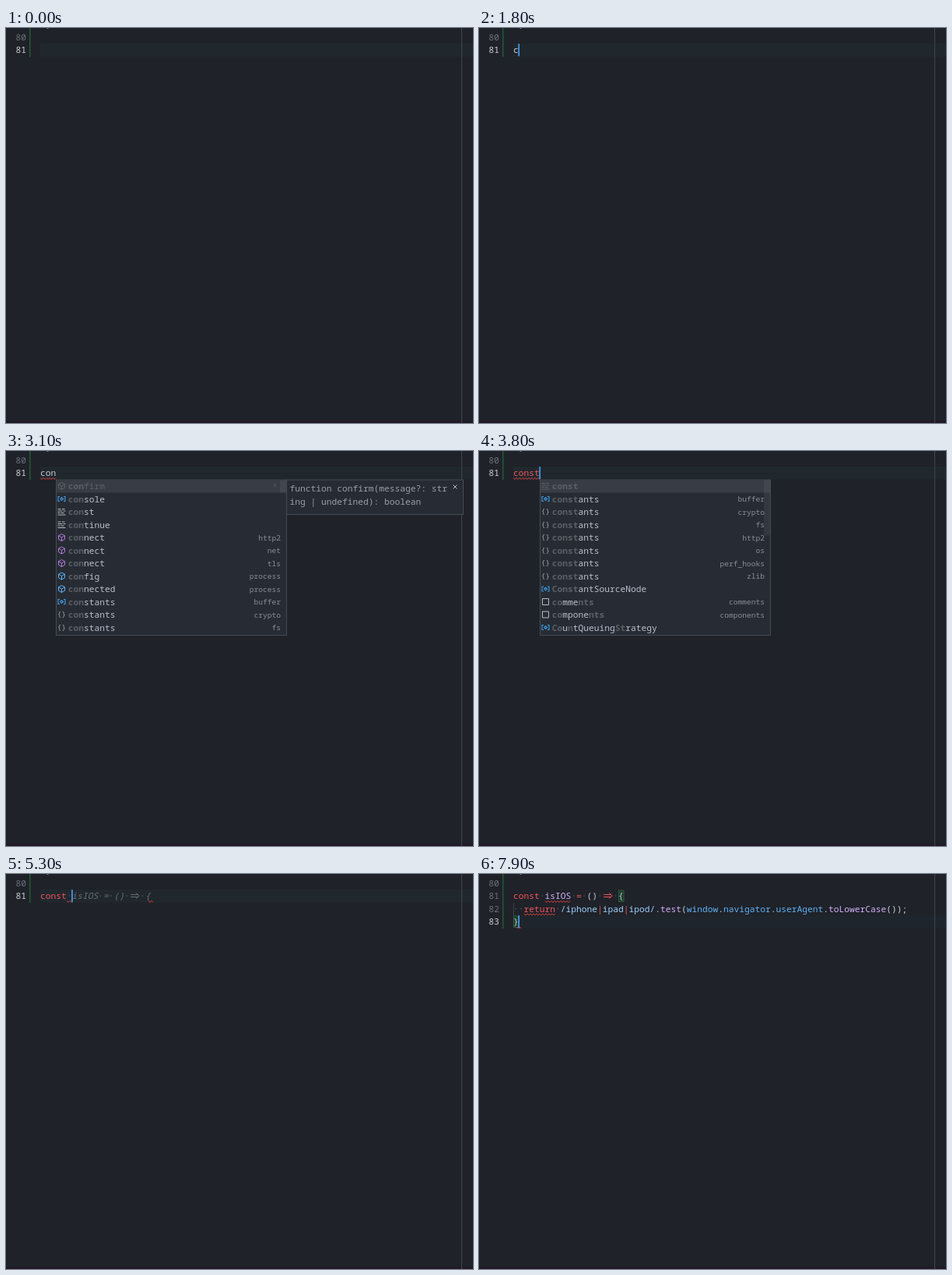
Recreate the animation shown at these times as an HTML page with a canvas. Size 600 px wide and 507 px high, loop 8 s.

```html
<!DOCTYPE html>
<html lang="en">
<head>
<meta charset="utf-8">
<title>Code editor completion</title>
<style>
html, body { margin: 0; width: 100%; height: 100%; overflow: hidden; background: #1f2229; }
canvas { display: block; width: 600px; height: 507px; }
</style>
</head>
<body>
<canvas id="stage" width="600" height="507"></canvas>
<script>
const ctx = document.getElementById('stage').getContext('2d');
const LOOP = 8000, CH = 6.75, LEFT = 44, ROW = 16.5;
const FACE = '"Noto Sans Mono", "DejaVu Sans Mono", monospace';
const RED = '#f2545b', LILAC = '#d2b0fa', SKY = '#9bd0ff', BLUE = '#5fb2f5',
      LIGHT = '#c6cdd6', GHOST = '#686c73', DIM = '#5c5f66', PURPLE = '#b07bd8';

// Rows: icon, label with matched parts between stars, origin
const conRows = ['m *con*firm', 'v *con*sole', 'k *con*st', 'k *con*tinue', 'm *con*nect http2',
  'm *con*nect net', 'm *con*nect tls', 'f *con*fig process', 'f *con*nected process',
  'v *con*stants buffer', 'n *con*stants crypto', 'n *con*stants fs'];
const constRows = ['k *const*', 'v *const*ants buffer', 'n *const*ants crypto', 'n *const*ants fs',
  'n *const*ants http2', 'n *const*ants os', 'n *const*ants perf_hooks', 'n *const*ants zlib',
  'v *Const*antSourceNode', 's *co*mme*nts* comments', 's *co*mpone*nts* components',
  'v *Co*u*n*tQueuing*St*rategy'];

const declared = [['const', RED], [' '], ['isIOS', LILAC], [' '], ['=', RED], [' '], ['()', LIGHT],
  [' '], ['=>', RED], [' '], ['{', LIGHT]];
const body = [['  '], ['return', RED], [' '], ['/iphone', SKY], ['|', RED], ['ipad', SKY], ['|', RED],
  ['ipod/', SKY], ['.', LIGHT], ['test', LILAC], ['(', LIGHT], ['window', BLUE], ['.', LIGHT],
  ['navigator', BLUE], ['.', LIGHT], ['userAgent', BLUE], ['.', LIGHT], ['toLowerCase', LILAC],
  ['());', LIGHT]];
const hint = declared.slice(2).map(([s]) => [s, GHOST]);
const bodyHint = body.map(([s]) => [s.replace(/ /g, '\u00a0'), GHOST]);
const typed = s => [[s, LIGHT]];
const keyword = declared.slice(0, 1);

// Each state holds from time t; blink is when the caret starts to pulse
const states = [
  { t: 0, text: [], col: 0, hidden: true },
  { t: 400, text: [], col: 0, blink: -200 },
  { t: 1700, text: typed('c'), col: 1, blink: 2200 },
  { t: 2000, text: typed('co'), col: 2, blink: 2500 },
  { t: 2100, text: typed('co'), col: 2, blink: 2600, rows: conRows, doc: true, wavy: [[44, 57.5]] },
  { t: 2200, text: typed('con'), col: 3, blink: 2600, rows: conRows, doc: true, wavy: [[44, 64]] },
  { t: 3700, text: typed('cons'), col: 4, blink: 4200, rows: constRows, wavy: [[44, 71]] },
  { t: 3800, text: keyword, col: 5, blink: 4300, rows: constRows, wavy: [[44, 78]] },
  { t: 5000, text: declared.slice(0, 2), col: 6, blink: 5500, wavy: [[44, 78]] },
  { t: 5200, text: declared.slice(0, 2), col: 6, blink: 5700, hint, wavy: [[78, 84], [183, 190]] },
  { t: 5600, text: declared, col: 21, blink: 6000 },
  { t: 6200, text: declared, col: 21, blink: 6000, block: true, wavy: [[44, 78], [176, 189]] },
  { t: 7200, text: declared, col: 1, blink: 7800, done: true },
  { t: 7500, text: declared, col: 1, blink: 7800, done: true,
    wavy: [[85, 118], [58, 98, 1]], checked: true }
];

function box(x, y, w, h, color) {
  ctx.fillStyle = color;
  ctx.fillRect(x, y, w, h);
}

function path(color, width, ...lines) {
  ctx.strokeStyle = color;
  ctx.lineWidth = width;
  ctx.beginPath();
  for (const pts of lines)
    for (let i = 0; i < pts.length; i += 2) ctx[i ? 'lineTo' : 'moveTo'](pts[i], pts[i + 1]);
  ctx.stroke();
}

function frame(x, y, w, h, fill, line) {
  box(x, y, w, h, line);
  box(x + 1, y + 1, w - 2, h - 2, fill);
}

function write(s, x, y, color, { style = '', size = 11.25, align = 'left' } = {}) {
  ctx.font = `${style} ${size}px ${FACE}`;
  ctx.textAlign = align;
  ctx.fillStyle = color;
  ctx.fillText(s, x, y);
}

function arrow(x, y, color) {
  path(color, 1, [x + 1.5, y - 5.5, x + 10.5, y - 5.5], [x + 1.5, y - 2.5, x + 10.5, y - 2.5],
    [x + 8.5, y - 7.5, x + 12.5, y - 4, x + 8.5, y - 0.5]);
}

function code(line, tokens, col = 0, style = '') {
  const y = 32 + line * ROW;
  for (const [s, color] of tokens) {
    const x = LEFT + col * CH;
    if (s[0] === ' ')
      for (let i = 0; i < s.length; i++) box(x + i * CH + 2.7, y - 4.6, 1.3, 1.3, '#555a63');
    else if (s === '=>') arrow(x, y, color);
    else write(s, x, y, color, { style });
    col += s.length;
  }
}

function squiggle([from, to, line = 0]) {
  const pts = [];
  for (let x = from, i = 0; x <= to; x += 2, i++) pts.push(x, 34.4 + line * ROW + (i % 2) * 2);
  path('#e5403f', 1, pts);
}

function icon(kind, x, y, dim) {
  const color = dim ? DIM : { m: PURPLE, f: BLUE, v: '#3f9be6', k: '#b4bac3', n: '#a4aab3', s: '#b4bac3' }[kind];
  if (kind === 'm' || kind === 'f')
    path(color, 1, [x + 5, y - 4.5, x + 9, y - 2.3, x + 9, y + 2.2, x + 5, y + 4.5, x + 1, y + 2.2,
      x + 1, y - 2.3, x + 5, y - 4.5], [x + 1, y - 2.3, x + 5, y, x + 9, y - 2.3], [x + 5, y, x + 5, y + 4.5]);
  else if (kind === 'v') {
    path(color, 1.1, [x + 2.5, y - 3, x + .5, y - 3, x + .5, y + 3, x + 2.5, y + 3],
      [x + 7.5, y - 3, x + 9.5, y - 3, x + 9.5, y + 3, x + 7.5, y + 3]);
    path(color, 1.3, [x + 3, y, x + 5, y - 1.7, x + 7, y, x + 5, y + 1.7, x + 3, y]);
  } else if (kind === 'k')
    path(color, 1, [x, y - 3.5, x + 4, y - 3.5], [x + 5.5, y - 3.5, x + 9, y - 3.5], [x, y - 1, x + 6, y - 1],
      [x + 7, y - 1, x + 10, y - 1], [x, y + 1.5, x + 3, y + 1.5], [x + 4, y + 1.5, x + 8, y + 1.5],
      [x, y + 4, x + 10, y + 4]);
  else if (kind === 'n') write('{}', x + 5, y + 3.3, color, { size: 9, align: 'center' });
  else path(color, 1, [x + 1, y - 4, x + 9, y - 4, x + 9, y + 4, x + 1, y + 4, x + 1, y - 4.5]);
}

function popup(x, rows, doc, prefix) {
  frame(x, 36.5, 297, 200.5, '#272c34', '#464b53');
  box(x + 1, 37.5, 295, 16, '#383d45');
  box(x + 288, 37.5, 8, doc ? 16 : 71, 'rgba(130,138,150,.13)');
  rows.forEach((row, i) => {
    const [kind, label, origin] = row.split(' ');
    const y = 45 + i * ROW;
    let tx = x + 15.7;
    icon(kind, x + 2.5, y, !i);
    label.split('*').forEach((part, j) => {
      const cut = doc && j === 1 ? prefix : part.length;
      const matched = part.slice(0, cut), rest = part.slice(cut);
      write(matched, tx, y + 4, j % 2 || !i ? DIM : '#b9c0cb', { style: j % 2 ? 'bold' : '' });
      if (rest) write(rest, tx + cut * CH, y + 4, i ? '#b9c0cb' : DIM);
      tx += part.length * CH;
    });
    if (origin) write(origin, x + 289, y + 3.5, '#888e97', { size: 9.57, align: 'right' });
  });
  if (!doc) return;
  path(DIM, 1, [x + 280, 42, x + 283, 44, x + 280, 46]);
  const dx = x + 296;
  frame(dx, 36.5, 228, 45.5, '#272c34', '#464b53');
  write('function confirm(message?: str', dx + 4.5, 52, '#999fa8');
  write('ing | undefined): boolean', dx + 4.5, 68.5, '#999fa8');
  path('#b4bac3', 1, [dx + 214.5, 43.5, dx + 219.5, 48.5], [dx + 219.5, 43.5, dx + 214.5, 48.5]);
}

// The caret stretches open and shut: 300 ms moves with 200 ms rests
function caretScale(t, blink) {
  if (t < blink) return 1;
  const phase = (t - blink) % 1000;
  const p = Math.min(1, Math.max(0, ((phase < 500 ? phase : 1000 - phase) - 100) / 300));
  return 1 - p * p * (3 - 2 * p);
}

function draw(t) {
  const s = states.filter(state => state.t <= t).pop();
  const line = s.done ? 2 : 0, top = 20 + line * ROW;
  box(0, 0, 600, 507, '#1f2229');
  box(0, 504, 600, 3, '#201a27');
  box(LEFT, top, 556, 16.5, s.done ? '#1f252c' : '#20282e');
  box(585, 0, 1, 507, '#42454c');
  box(30, 0, 1.6, 37 + line * ROW, '#20592f');
  box(52.5, 0, 2, 1, '#777d86');
  for (let i = -1; i <= line; i++)
    write(81 + i, 12.6, 32 + i * ROW, i === line ? '#cdd3db' : '#6b727c');

  if (s.done) {
    box(LEFT, 37, 1, 16, '#3c424a');
    frame(179, 20.5, 7.5, 15.5, '#1d3a2d', '#285c3c');
    frame(44, 53.5, 7.5, 15.5, '#1d3a2d', '#285c3c');
    code(1, body);
    code(2, [['}', LIGHT]]);
  }
  code(0, s.text);
  if (s.hint) code(0, s.hint, s.col, 'italic');
  if (s.block) {
    code(1, bodyHint, 0, 'italic');
    code(2, [['}', GHOST]], 0, 'italic');
  }
  (s.wavy || []).forEach(squiggle);
  if (s.checked) box(48, 68.3, 6, 1.2, '#c93d3f');

  const x = LEFT + s.col * CH;
  if (!s.hidden) {
    const h = 16 * caretScale(t, s.blink);
    box(x - 0.4, top + 8.2 - h / 2, 1.7, h, '#4a9cf0');
  }
  if (s.rows) popup(Math.round(x), s.rows, s.doc, s.col);
}

function tick(now) {
  draw(now % LOOP);
  requestAnimationFrame(tick);
}
requestAnimationFrame(tick);
</script>
</body>
</html>
```
